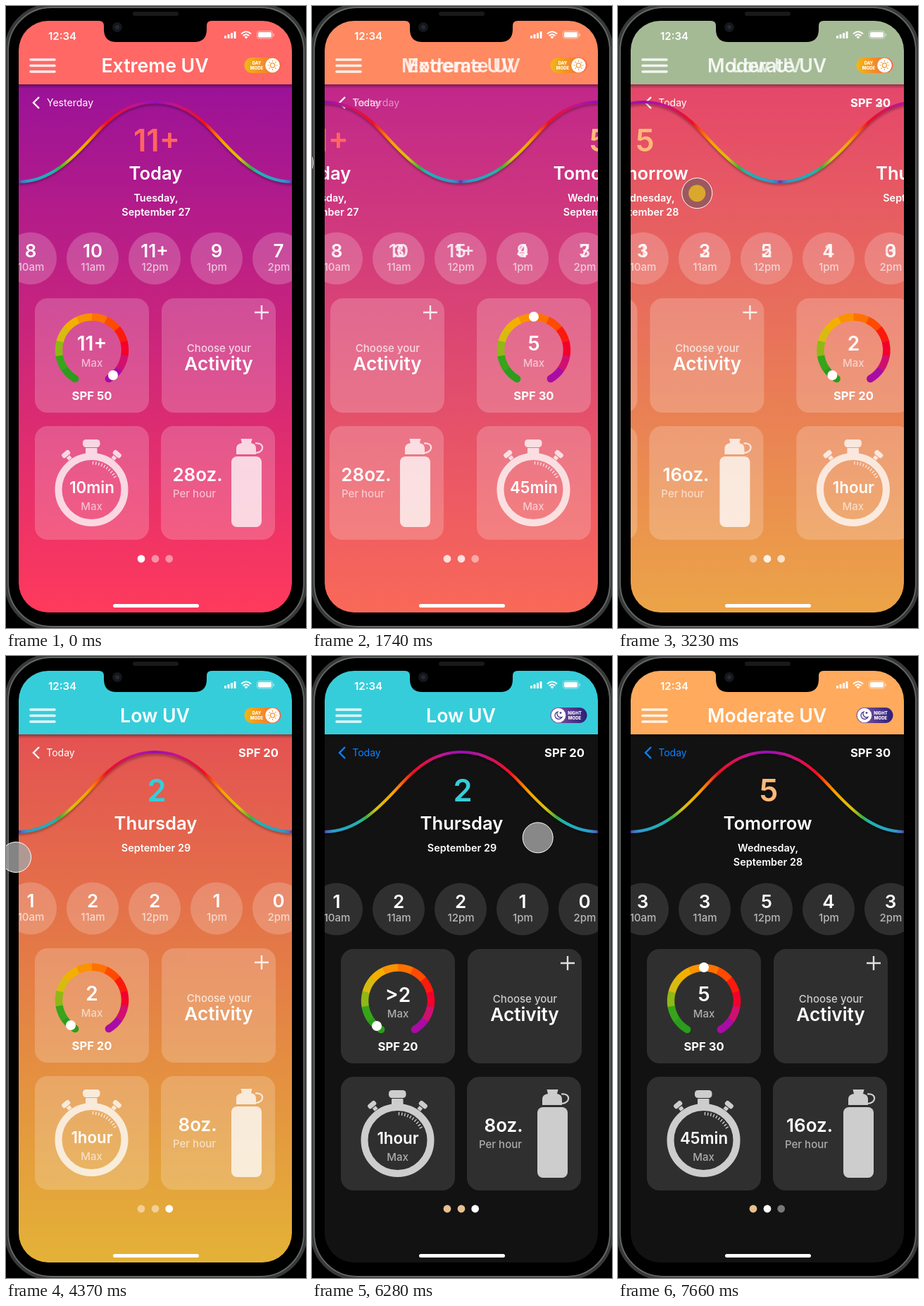
Animation of 426 by 881 pixels, one loop 7.99 s. Source, as an HTML page:

```html
<!DOCTYPE html>
<html lang="en">
<head>
<meta charset="utf-8">
<title>UV index app</title>
<style>
html, body { margin: 0; width: 100%; height: 100%; overflow: hidden; background: #000; }
svg { display: block; width: 426px; height: 881px; }
text { font-family: Inter, Roboto, sans-serif; }
</style>
</head>
<body>
<svg id="stage" viewBox="0 0 426 881" fill="#fff"></svg>
<script>
const LOOP = 7990, PAGE_W = 388;

const pages = [
  { title: 'Extreme UV', head: [255, 104, 101], num: '#ff6660', top: [155, 18, 152], bottom: [255, 58, 92],
    index: '11+', day: 'Today', date: ['Tuesday,', 'September 27'], hours: ['8', '10', '11+', '9', '7'],
    spf: 50, knob: [152, 523], time: '10min', water: '28oz.' },
  { title: 'Moderate UV', head: [255, 170, 92], num: '#ffb978', top: [230, 60, 125], bottom: [243, 152, 84],
    index: '5', day: 'Tomorrow', date: ['Wednesday,', 'September 28'], hours: ['3', '3', '5', '4', '3'],
    spf: 30, knob: [122, 440], time: '45min', water: '16oz.' },
  { title: 'Low UV', head: [54, 205, 218], num: '#36cdda', top: [228, 82, 82], bottom: [228, 178, 55],
    index: '2', day: 'Thursday', date: ['September 29'], hours: ['1', '2', '2', '1', '0'],
    spf: 20, knob: [92, 523], time: '1hour', water: '8oz.' }
];
const hourX = [35, 123, 211, 299, 387];
const dialColors = ['#2a9d1c', '#36a51a', '#8fb815', '#d8bb10', '#f3b000', '#fb9200',
  '#ff7200', '#ff4a00', '#fb1a0c', '#f4002a', '#d0106e', '#a80ca4'];
const waveStops = [[0, '#6a2aa8'], [1, '#4a6fc0'], [3, '#2a9bcc'], [13, '#1fb5b0'], [15, '#3ab03a'], [19, '#d8c010'],
  [25, '#f5a500'], [28, '#ff6a00'], [32, '#f01020'], [37, '#e0104a'], [43, '#c01492'], [50, '#960fb4']];

// ---- markup helpers ----
const text = (x, y, size, weight, str, more = '') =>
  `<text x="${x}" y="${y}" font-size="${size}" font-weight="${weight}" text-anchor="middle" ${more}>${str}</text>`;
const box = (x, y, w, h, r, more = '') =>
  `<rect x="${x}" y="${y}" width="${w}" height="${h}" rx="${r}" ${more}/>`;
const disc = (x, y, r, more = '') => `<circle cx="${x}" cy="${y}" r="${r}" ${more}/>`;
const line = (d, width, more = '') =>
  `<path d="${d}" fill="none" stroke="#fff" stroke-width="${width}" ${more}/>`;
const polar = (cx, cy, r, deg) => {
  const a = deg * Math.PI / 180;
  return `${(cx + r * Math.cos(a)).toFixed(2)} ${(cy + r * Math.sin(a)).toFixed(2)}`;
};

function dial(p, i) {
  const n = dialColors.length, step = 299 / n;
  const arcs = dialColors.map((c, k) => {
    const a = 120.5 + k * step;
    return `<path d="M${polar(122, 487.5, 47, a)}A47 47 0 0 1 ${polar(122, 487.5, 47, a + step + .4)}"
      fill="none" stroke="${c}" stroke-width="10.5"/>`;
  }).join('');
  const value = i == 2
    ? text(122, 488, 28, 600, '2', 'id="plain"') + text(122, 489, 28, 600, '&gt;2', 'id="over"')
    : text(122, 488, 28, 600, p.index);
  return disc(98.2, 528, 5.2, `fill="${dialColors[0]}"`) + disc(145.8, 528, 5.2, `fill="${dialColors[n - 1]}"`) + arcs +
    disc(...p.knob, 7) + value + text(122, 510.5, 15, 500, 'Max', 'opacity=".6"') +
    text(122, 557.5, 16.6, 700, 'SPF ' + p.spf);
}

function stopwatch(p) {
  let ticks = '';
  for (let a = -87; a <= -28; a += 6.5) ticks += `M${polar(121.5, 685, 35.5, a)}L${polar(121.5, 685, 40, a)}`;
  const side = s => `<g transform="translate(${121.5 + s * 36} 635) rotate(${s * 40})">` +
    box(-6.5, -4, 13, 7, 2.5) + box(-3, 4, 6, 5, 0) + '</g>';
  return `<g opacity=".76">` + disc(121.5, 685, 47, 'fill="none" stroke="#fff" stroke-width="10"') +
    box(109, 614, 24.5, 11, 4.5) + box(113, 626, 16.5, 11, 1) + side(-1) + side(1) + line(ticks, 1.4) + '</g>' +
    text(122, 690, 22.3, 600, p.time) + text(121.5, 714, 15, 500, 'Max', 'opacity=".6"');
}

function bottle(p) {
  return `<g opacity=".76">` + box(320, 638, 43, 100, 8) +
    `<path d="M327 635V627Q327 620 335 619L333.500 613H349.500L348 619Q355 620 355 627V635Z"/>` +
    line('M354 619.500C368 618 367 633 354 633', 2.2) + '</g>' +
    text(272, 673, 26, 600, p.water) + text(267.5, 696, 15, 500, 'Per hour', 'opacity=".6"');
}

const wavePath = 'M18 249C66 249 101 209 125 183S174 136 212 136C250 136 275 157 299 183S358 249 406 249';

const pageMarkup = (p, i) => `<g class="page">
  <path d="${wavePath}" transform="translate(0 3)" fill="none" stroke="#000" stroke-opacity=".28" stroke-width="4" filter="url(#soft)"/>
  <path d="${wavePath}" fill="none" stroke="url(#rainbow)" stroke-width="4.200"/>
  ${text(214, 206, 43.5, 600, p.index, `fill="${p.num}"`)}
  ${text(212.5, 246, 25.6, 600, p.day)}
  ${p.date.map((d, k) => text(213, 277 + 20 * k, 14.4, 600, d)).join('')}
  <g class="drop">
    <g class="glass">${box(41, 414, 162, 162, 18) + box(221, 414, 162, 162, 18) +
      box(41, 595, 162, 161, 18) + box(220, 595, 162, 161, 18)}</g>
    ${dial(p, i)}
    ${line('M353 434H373M363 424V444', 2.4, 'opacity=".85"')}
    ${text(302.5, 490, 15, 500, 'Choose your', 'opacity=".75"')}
    ${text(302, 516, 26.2, 600, 'Activity')}
    ${stopwatch(p)}${bottle(p)}
  </g></g>`;

const rays = [...Array(8).keys()].map(k => `M${polar(0, 0, 5, k * 45)}L${polar(0, 0, 7, k * 45)}`).join('');
const stops = [...waveStops, ...waveStops.slice(0, -1).reverse().map(([o, c]) => [100 - o, c])]
  .map(([o, c]) => `<stop offset="${o}%" stop-color="${c}"/>`).join('');

stage.innerHTML = `
<defs>
  <clipPath id="screen">${box(18, 21, 388, 838, 42)}</clipPath>
  <linearGradient id="rainbow" gradientUnits="userSpaceOnUse" x1="18" x2="406" y1="0" y2="0">${stops}</linearGradient>
  <linearGradient id="sky" x1="0" y1="0" x2="0" y2="1"><stop id="skyTop"/><stop id="skyBottom" offset="1"/></linearGradient>
  <linearGradient id="dayPill"><stop stop-color="#f2b714"/><stop offset="1" stop-color="#f4633c"/></linearGradient>
  <linearGradient id="nightPill"><stop stop-color="#8a5aa8"/><stop offset="1" stop-color="#2a1f78"/></linearGradient>
  <linearGradient id="shade" x1="0" y1="0" x2="0" y2="1"><stop stop-opacity=".35"/><stop offset="1" stop-opacity="0"/></linearGradient>
  <filter id="soft" filterUnits="userSpaceOnUse" x="0" y="120" width="426" height="150"><feGaussianBlur stdDeviation="1.500"/></filter>
</defs>
${box(0, 0, 426, 881, 0, 'fill="#000"')}
${box(1, 0, 424, 881, 63, 'fill="none" stroke="#373a38" stroke-width="6"')}
${box(3, 2, 420, 877, 61, 'fill="none" stroke="#636764" stroke-width="1.800"')}
${box(180, 8, 65, 6, 3, 'fill="#191919"')}
<g clip-path="url(#screen)">
  ${box(18, 111, 388, 748, 0, 'fill="url(#sky)"')}
  ${box(18, 111, 388, 6, 0, 'fill="url(#shade)"')}
  <g id="back">${line('M47 129L39 137L47 145', 2.4, 'id="arrow"')}
    <g id="yesterday">${text(91, 142, 14.1, 400, 'Yesterday')}</g>
    <g id="today">${text(77.5, 142, 14, 400, 'Today')}</g></g>
  ${pages.map(pageMarkup).join('')}
  ${[30, 20].map(s => text(358.5, 143, 16.6, 700, 'SPF ' + s, `id="spf${s}"`)).join('')}
  <g class="drop"><g class="glass">${hourX.map(x => disc(x, 357.5, 37)).join('')}</g>
    ${pages.map(p => '<g class="hours">' + p.hours.map((h, k) => text(hourX[k], 356, 26, 600, h)).join('') + '</g>').join('')}
    ${['10am', '11am', '12pm', '1pm', '2pm'].map((h, k) => text(hourX[k] + .5, 374.5, 15, 500, h, 'opacity=".65"')).join('')}
  </g>
  ${[192, 212, 231.7].map(x => disc(x, 783, 5.4, 'class="dot"')).join('')}
  ${box(152, 847, 122, 5, 2.5)}
  ${box(18, 21, 388, 90, 0, 'id="head"')}
  ${pages.map(p => text(211.5, 94, 26.6, 600, p.title, 'class="title"')).join('')}
  ${line('M35 76H69M35 84.500H69M35 93H69', 3.6, 'stroke-linecap="round" opacity=".87"')}
  ${text(80, 47.5, 15, 600, '12:34')}
  ${[0, 1, 2, 3].map(k => box(310 + k * 4.5, 42 - k * 2, 3, 4 + k * 2, .8)).join('')}
  ${line('M334 39.500Q341 33 348 39.500M336.700 42.300Q341 38.300 345.300 42.300', 2)}
  <path d="M338.500 43.800Q341 41.600 343.500 43.800L341 46.500Z"/>
  ${box(356.5, 35.5, 22, 10.5, 3, 'fill="none" stroke="#fff" stroke-opacity=".5"')}${box(358, 37, 19, 7.5, 1.8)}
  ${box(379.5, 39, 1.5, 4, .7, 'opacity=".5"')}
  <g id="day">${box(338.5, 73, 52, 22, 11, 'fill="url(#dayPill)"')}
    ${text(356, 83, 6, 800, 'DAY') + text(356, 89.5, 6, 800, 'MODE')}</g>
  <g id="night">${box(338.5, 73, 52, 22, 11, 'fill="url(#nightPill)"')}
    ${text(373, 83, 6, 800, 'NIGHT') + text(373, 89.5, 6, 800, 'MODE')}</g>
  <g id="toggle">${disc(0, 0, 10.3)}
    <g id="sun" fill="none" stroke="#f09a3a" stroke-width="1.200">${disc(0, 0, 3.2)}<path d="${rays}"/></g>
    <path id="moon" d="M-1 -5A5.300 5.300 0 1 0 5 2.500A5 5 0 0 1 -1 -5ZM3 -5v3M1.500 -3.500h3" fill="none" stroke="#3a2a80" stroke-width="1.200"/></g>
  <path d="M132 21Q139 21 139 28V33Q139 51 157 51H267Q285 51 285 33V28Q285 21 292 21Z" fill="#000"/>
</g>
${disc(158, 30, 7, 'fill="#14161a"')}${disc(158, 30, 3, 'fill="#23283a"')}
<g id="cursor">${disc(0, 0, 21.5, 'id="ring" stroke="#fff" stroke-width="1"')}${disc(0, 0, 12, 'id="press" fill="#daa82d"')}</g>`;

// ---- motion ----
const clamp = v => Math.max(0, Math.min(1, v));
const span = (t, a, b) => clamp((t - a) / (b - a));
const inOut = u => u * u * (3 - 2 * u), easeIn = u => u * u, easeOut = u => u * (2 - u), linear = u => u;
const blend = (a, b, u) => a.map((v, k) => v + (b[k] - v) * u);
const rgb = c => `rgb(${c.map(Math.round)})`;
const set = (el, attrs) => { for (const k in attrs) el.setAttribute(k, attrs[k]); };
const $ = id => document.getElementById(id);
const all = cls => [...stage.querySelectorAll('.' + cls)];
const fade = (id, o) => $(id).setAttribute('opacity', o);

// time, x, y, easing towards this point
const route = [
  [660, 254, 189], [1010, 300, 226, inOut], [1460, 300, 226], [1740, -20, 222, inOut], [2210, -20, 278, inOut],
  [2700, 318, 259, inOut], [2950, 318, 259], [3230, 113, 265, easeIn], [3500, 14, 285, easeOut], [4370, 14, 285],
  [4960, 384, 86, inOut], [5320, 384, 86], [5520, 364, 92, linear], [5750, 352, 94, easeOut], [5980, 352, 94],
  [6150, 343, 210, easeIn], [6280, 321, 257, linear], [6870, 228, 354, easeOut], [6960, 228, 354], [7450, 384, 348, inOut]
];
function cursorAt(t) {
  const k = route.findIndex(p => p[0] > t);
  if (k < 1) return (k ? route[route.length - 1] : route[0]).slice(1, 3);
  const a = route[k - 1], b = route[k];
  return blend(a.slice(1, 3), b.slice(1, 3), (b[3] || linear)(span(t, a[0], b[0])));
}
const presses = [[1440, 2100], [2930, 3480], [6940, 7450]];

const pageEls = all('page'), titleEls = all('title'), hourEls = all('hours'),
  glassEls = all('glass'), dropEls = all('drop'), dotEls = all('dot');

function draw(t) {
  const pos = inOut(span(t, 1460, 2020)) + inOut(span(t, 2950, 3550)) - inOut(span(t, 6950, 7600));
  const night = easeOut(span(t, 5320, 5980));
  const i = Math.min(1, Math.floor(pos)), u = pos - i;
  const mix = key => blend(pages[i][key], pages[i + 1][key], u);
  // both neighbours stay strong through the middle of a dissolve
  const weight = k => clamp(1.6 * (1 - Math.abs(pos - k)));
  const dark = [18, 18, 18], white = [255, 255, 255];

  set($('skyTop'), { 'stop-color': rgb(blend(mix('top'), dark, night)) });
  set($('skyBottom'), { 'stop-color': rgb(blend(mix('bottom'), dark, night)) });
  set($('head'), { fill: rgb(mix('head')) });

  pages.forEach((p, k) => {
    set(pageEls[k], { transform: `translate(${(k - pos) * PAGE_W} 0)` });
    set(titleEls[k], { opacity: weight(k) });
    set(hourEls[k], { opacity: weight(k) });
    const idle = blend(white, k < 2 ? [233, 191, 144] : [120, 120, 120], clamp(night * 2));
    set(dotEls[k], {
      fill: rgb(blend(idle, white, weight(k))),
      'fill-opacity': Math.max(.45 + .55 * clamp(night * 2), weight(k))
    });
  });
  glassEls.forEach(g => set(g, { opacity: .2 - .08 * night }));
  dropEls.forEach(g => set(g, { transform: `translate(0 ${night})` }));

  const link = rgb(blend(white, [10, 132, 255], night));
  set($('back'), { fill: link });
  set($('arrow'), { stroke: link });
  fade('yesterday', clamp(1 - pos));
  fade('today', clamp(1.6 * pos));
  fade('spf30', weight(1) * span(t, 2020, 2210));
  fade('spf20', weight(2));
  fade('plain', 1 - night);
  fade('over', night);

  fade('day', 1 - night);
  fade('night', night);
  fade('sun', 1 - night);
  fade('moon', night);
  set($('toggle'), { transform: `translate(${378.5 - 28.5 * night} 84)` });

  const [x, y] = cursorAt(t);
  const down = Math.max(...presses.map(([a, b]) => span(t, a, a + 120) * (1 - span(t, b - 120, b))));
  set($('cursor'), { transform: `translate(${x} ${y})`, opacity: span(t, 640, 800) * (1 - span(t, 7250, 7550)) });
  set($('ring'), { fill: rgb(blend([165, 165, 165], [110, 90, 92], down)), 'fill-opacity': .8 - .18 * down });
  fade('press', down);
}

function tick(now) {
  draw(now % LOOP);
  requestAnimationFrame(tick);
}
draw(0);
requestAnimationFrame(tick);
</script>
</body>
</html>
```
